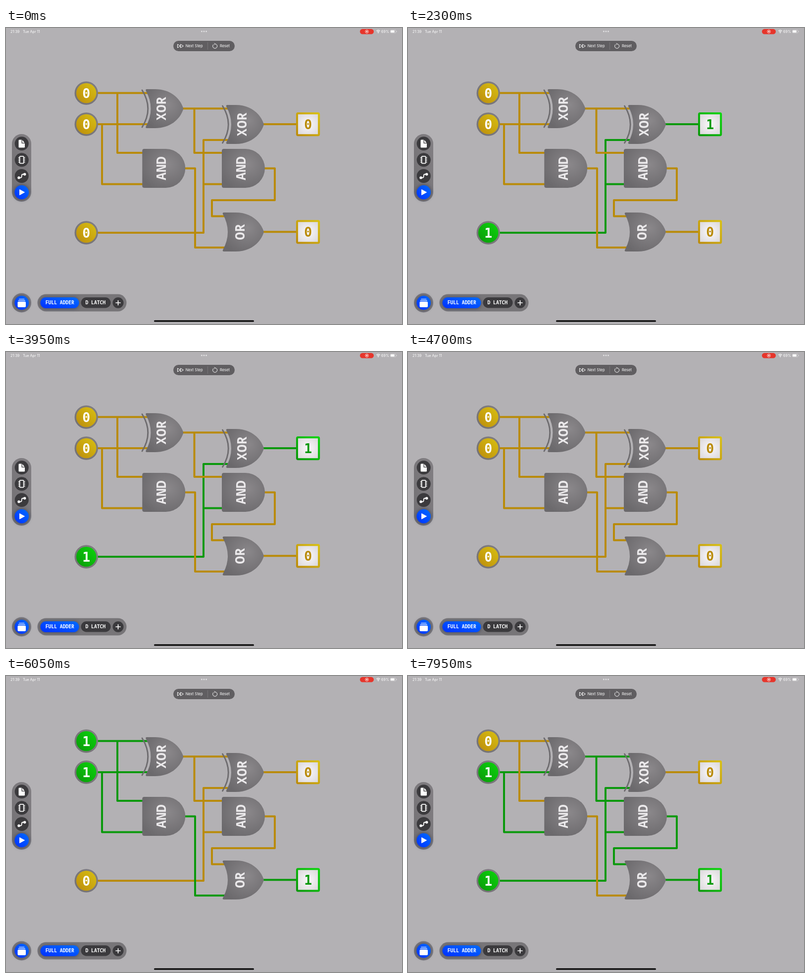
An HTML page that plays this animation: 800 px wide and 600 px high, repeating every 8000 ms.

```html
<!DOCTYPE html>
<html lang="en">
<head>
<meta charset="utf-8">
<title>Full adder</title>
<style>
  html, body { margin: 0; width: 100%; height: 100%; overflow: hidden; background: #b3b1b4; }
  svg { display: block; width: 100vw; height: 100vh; }
  text { fill: #fff; font-family: Inter, sans-serif; }
  .mono { font-family: "Noto Sans Mono", monospace; font-weight: 700; }
  .label { font-size: 27px; text-anchor: middle; fill: #ebe9eb; }
  .digit { font: 700 26.5px "DejaVu Sans Mono", monospace; text-anchor: middle; }
  .tab { font-size: 9.7px; }
  .line { fill: none; stroke: #fff; }
  .wire { fill: none; stroke-width: 4; stroke-linejoin: round; }
</style>
</head>
<body>
<svg viewBox="0 0 800 600">
  <defs>
    <radialGradient id="gate" cx=".6" cy=".4" r=".7">
      <stop stop-color="#8a878a"/><stop offset="1" stop-color="#6b696c"/>
    </radialGradient>
    <linearGradient id="ring" x1="0" y1="1" x2="1" y2="0">
      <stop stop-color="#727073"/><stop offset="1" stop-color="#827f83"/>
    </linearGradient>
    <linearGradient id="low" x1="0" y1="1" x2="1" y2="0">
      <stop stop-color="#bc8c0c"/><stop offset="1" stop-color="#d8c012"/>
    </linearGradient>
    <linearGradient id="high" x1="0" y1="1" x2="1" y2="0">
      <stop stop-color="#0a980a"/><stop offset="1" stop-color="#0cd60c"/>
    </linearGradient>
    <radialGradient id="paper" r=".65">
      <stop stop-color="#faf8fa"/><stop offset="1" stop-color="#dad7da"/>
    </radialGradient>
    <linearGradient id="blue" x1="0" y1="1" x2="1" y2="0">
      <stop stop-color="#0030ff"/><stop offset="1" stop-color="#006cff"/>
    </linearGradient>
    <filter id="glow" x="-40%" y="-60%" width="180%" height="220%">
      <feGaussianBlur stdDeviation="3"/>
    </filter>
  </defs>

  <rect width="800" height="600" fill="#b3b1b4"/>

  <!-- status bar -->
  <g font-size="7.2">
    <text x="9" y="9.7">21:39</text>
    <text x="34" y="9.7">Tue Apr 11</text>
    <text x="758" y="9.7">69%</text>
  </g>
  <g fill="#e4e3e5">
    <circle cx="395.5" cy="7" r="1.4"/><circle cx="400" cy="7" r="1.4"/><circle cx="404.5" cy="7" r="1.4"/>
  </g>
  <rect x="715" y="2" width="28" height="10.5" rx="5.2" fill="#e6352b"/>
  <circle class="line" cx="729" cy="7.2" r="3.2" stroke-width=".8"/>
  <circle cx="729" cy="7.2" r="1.4" fill="#fff"/>
  <path class="line" stroke-width="1.1" d="M748.4 6Q752 2.8 755.6 6M749.9 7.8Q752 5.9 754.1 7.8"/>
  <circle cx="752" cy="9.4" r="1" fill="#fff"/>
  <rect class="line" x="776.4" y="4" width="11.4" height="6" rx="1.8" stroke-width=".6" opacity=".6"/>
  <rect x="777.2" y="4.7" width="7.6" height="4.6" rx="1" fill="#fff"/>
  <path class="line" stroke-width=".9" opacity=".6" d="M789 6V8.2"/>

  <!-- step controls -->
  <rect x="338" y="26" width="124" height="21" rx="10.5" fill="#605e61"/>
  <path stroke="#777578" d="M407.5 29V44"/>
  <path class="line" stroke-width="1" stroke-linejoin="round" d="M346.5 33V40L352.3 36.5ZM352.5 33V40L358.5 36.5Z"/>
  <path class="line" stroke-width="1" d="M419.4 33.2A4.5 4.5 0 1 0 422.6 32.3L420.6 31M422.6 32.3L420.9 34.2"/>
  <g font-size="7.5">
    <text x="362.7" y="39.2">Next Step</text>
    <text x="432" y="39.2">Reset</text>
  </g>

  <g id="circuit"></g>

  <!-- side toolbar -->
  <rect x="12" y="215" width="39" height="137" rx="19.5" fill="url(#ring)"/>
  <circle cx="31.5" cy="333" r="15.5" fill="#4b4d60" filter="url(#glow)"/>
  <g fill="#3b3a3d">
    <circle cx="31.7" cy="234.3" r="14"/><circle cx="31.7" cy="267.3" r="14"/><circle cx="31.7" cy="300" r="14"/>
  </g>
  <circle cx="31.7" cy="333" r="14.3" fill="url(#blue)"/>
  <path fill="#fff" d="M27 226.5H31.5V234H38V241Q38 242.5 36.5 242.5H27Q25.5 242.5 25.5 241V228Q25.5 226.5 27 226.5ZM32.8 226.8L37.7 232.7H32.8Z"/>
  <rect class="line" x="27.7" y="260.2" width="8" height="14.2" rx="1.2" stroke-width="1.7"/>
  <path class="line" stroke-width="1.3" d="M24.8 262.5H27M24.8 265.7H27M24.8 268.9H27M24.8 272.1H27M36.4 262.5H38.6M36.4 265.7H38.6M36.4 268.9H38.6M36.4 272.1H38.6"/>
  <path class="line" stroke-width="1.8" d="M26 303.5H29.5Q31.7 303.5 31.7 300T34 296.5H38"/>
  <circle cx="26" cy="303.5" r="2.7" fill="#fff"/><circle cx="37.7" cy="296.5" r="2.7" fill="#fff"/>
  <path fill="#fff" stroke="#fff" stroke-linejoin="round" d="M27.5 327.5V338.5L37.5 333Z"/>

  <!-- document bar -->
  <circle cx="31.5" cy="557" r="19.5" fill="url(#ring)"/>
  <circle cx="31.5" cy="557" r="15" fill="#4b4d60" filter="url(#glow)"/>
  <circle cx="31.7" cy="557" r="14.3" fill="url(#blue)"/>
  <rect x="23.5" y="554.5" width="16.5" height="11.5" rx="2" fill="#fff"/>
  <path class="line" stroke-width="1.2" stroke-linecap="round" d="M25.2 552.3H38.3M26.8 549.5H36.7"/>
  <rect x="63.5" y="539.5" width="180" height="35" rx="17.5" fill="#777578"/>
  <rect x="69" y="546" width="79" height="23" rx="11.5" fill="#4b4d60" filter="url(#glow)"/>
  <rect x="69.5" y="546" width="78" height="22" rx="11" fill="url(#blue)"/>
  <rect x="151.5" y="546" width="60" height="21.5" rx="10.7" fill="#3b3a3d"/>
  <circle cx="226.5" cy="557" r="11" fill="#3b3a3d"/>
  <path class="line" stroke-width="1.7" stroke-linecap="round" d="M222 557H231M226.5 552.5V561.5"/>
  <text class="mono tab" x="79.8" y="560.3">FULL ADDER</text>
  <text class="mono tab" x="160.5" y="560.3">D LATCH</text>
  <rect x="299" y="592.5" width="202" height="3" rx="1.5" fill="#000"/>
</svg>

<script>
const LOOP = 8000;
const COLORS = ["#b98b09", "#0a990c"];
const FILLS = ["url(#low)", "url(#high)"];

// [start ms, input bits from top to bottom]
const STEPS = [
  [0, "000"], [350, "100"], [650, "110"], [1000, "111"],
  [2000, "011"], [2300, "001"], [2600, "000"], [3500, "001"],
  [4450, "000"], [4900, "100"], [5850, "110"], [6200, "010"], [6600, "011"]
];

const WIRES = {
  b: "M185 195H287M194 195V316.5H277",
  a: "M185 131.7H287M225 131.7V253H277",
  c: "M185 415H399V227H448M399 316.5H438",
  half: "M357 163.3H448M380.5 163.3V253H438",
  and1: "M361 284.5H382V445H444",
  and2: "M521 284.5H543V349H416V381.5H444",
  sum: "M519 195H588",
  carry: "M519 413.2H588"
};
const INPUTS = { a: 132, b: 195, c: 415 };
const OUTPUTS = { sum: 195, carry: 413.2 };

const label = (text, x, y) =>
  `<text class="mono label" transform="translate(${x} ${y}) rotate(-90)">${text}</text>`;

// Rounded arrow body with a concave back, tip at (tip, y)
const shield = (left, tip, y) =>
  `<path fill="url(#gate)" d="M${left + 2} ${y - 39.5}H${tip - 57}C${tip - 28} ${y - 39.5} ${tip - 7} ${y - 23} ${tip} ${y}
   C${tip - 7} ${y + 23} ${tip - 28} ${y + 39.5} ${tip - 57} ${y + 39.5}H${left + 2}Q${left - 1} ${y + 39.5} ${left} ${y + 36.5}
   Q${left + 20} ${y} ${left} ${y - 36.5}Q${left - 1} ${y - 39.5} ${left + 2} ${y - 39.5}Z"/>`;

const xorGate = (x, y) => shield(x, x + 76, y) +
  `<path fill="none" stroke="#6d6b6e" stroke-width="2.8" stroke-linecap="round"
    d="M${x - 7.5} ${y - 37.5}Q${x + 16} ${y} ${x - 7.5} ${y + 37.5}"/>` + label("XOR", x + 40.5, y);

const andGate = (x, y) =>
  `<path fill="url(#gate)" d="M${x + 4} ${y - 39.5}H${x + 47.5}a39.5 39.5 0 0 1 0 79H${x + 4}
   q-4 0 -4 -4v-71q0 -4 4 -4Z"/>` + label("AND", x + 47.5, y);

const orGate = (x, y) => shield(x, x + 83, y) + label("OR", x + 43.5, y);

const input = ([name, y]) =>
  `<circle cx="162.2" cy="${y}" r="23.7" fill="url(#ring)"/>
   <circle cx="162.2" cy="${y}" r="20.3" data-fill="${name}"/>
   <text class="digit" x="162.2" y="${y + 9.7}" data-digit="${name}"></text>`;

const output = ([name, y]) =>
  `<rect x="588" y="${y - 22}" width="44.2" height="44.2" rx="2" fill="url(#paper)" stroke-width="4" data-border="${name}"/>
   <text class="digit" x="610.2" y="${y + 9.7}" data-digit="${name}" data-ink="${name}"></text>`;

const circuit = document.getElementById("circuit");
circuit.innerHTML =
  Object.entries(WIRES).map(([name, d]) => `<path class="wire" d="${d}" data-wire="${name}"/>`).join("") +
  xorGate(282.5, 163.5) + xorGate(445, 195.5) +
  andGate(275.3, 284.5) + andGate(436, 284.5) + orGate(438, 413.5) +
  Object.entries(INPUTS).map(input).join("") +
  Object.entries(OUTPUTS).map(output).join("");

function evaluate(bits) {
  const [a, b, c] = [...bits].map(Number);
  const half = a ^ b, and1 = a & b, and2 = half & c;
  return { a, b, c, half, and1, and2, sum: half ^ c, carry: and1 | and2 };
}

const each = (key, apply) =>
  circuit.querySelectorAll(`[data-${key}]`).forEach(el => apply(el, el.dataset[key]));

let shown;
function show(bits) {
  if (bits === shown) return;
  shown = bits;
  const state = evaluate(bits);
  each("wire", (el, name) => el.setAttribute("stroke", COLORS[state[name]]));
  each("fill", (el, name) => el.setAttribute("fill", FILLS[state[name]]));
  each("border", (el, name) => el.setAttribute("stroke", FILLS[state[name]]));
  each("digit", (el, name) => el.textContent = state[name]);
  each("ink", (el, name) => el.style.fill = COLORS[state[name]]);
}

const origin = performance.now();
function frame() {
  const t = (performance.now() - origin) % LOOP;
  show(STEPS.findLast(([start]) => start <= t)[1]);
  requestAnimationFrame(frame);
}
frame();
</script>
</body>
</html>
```
